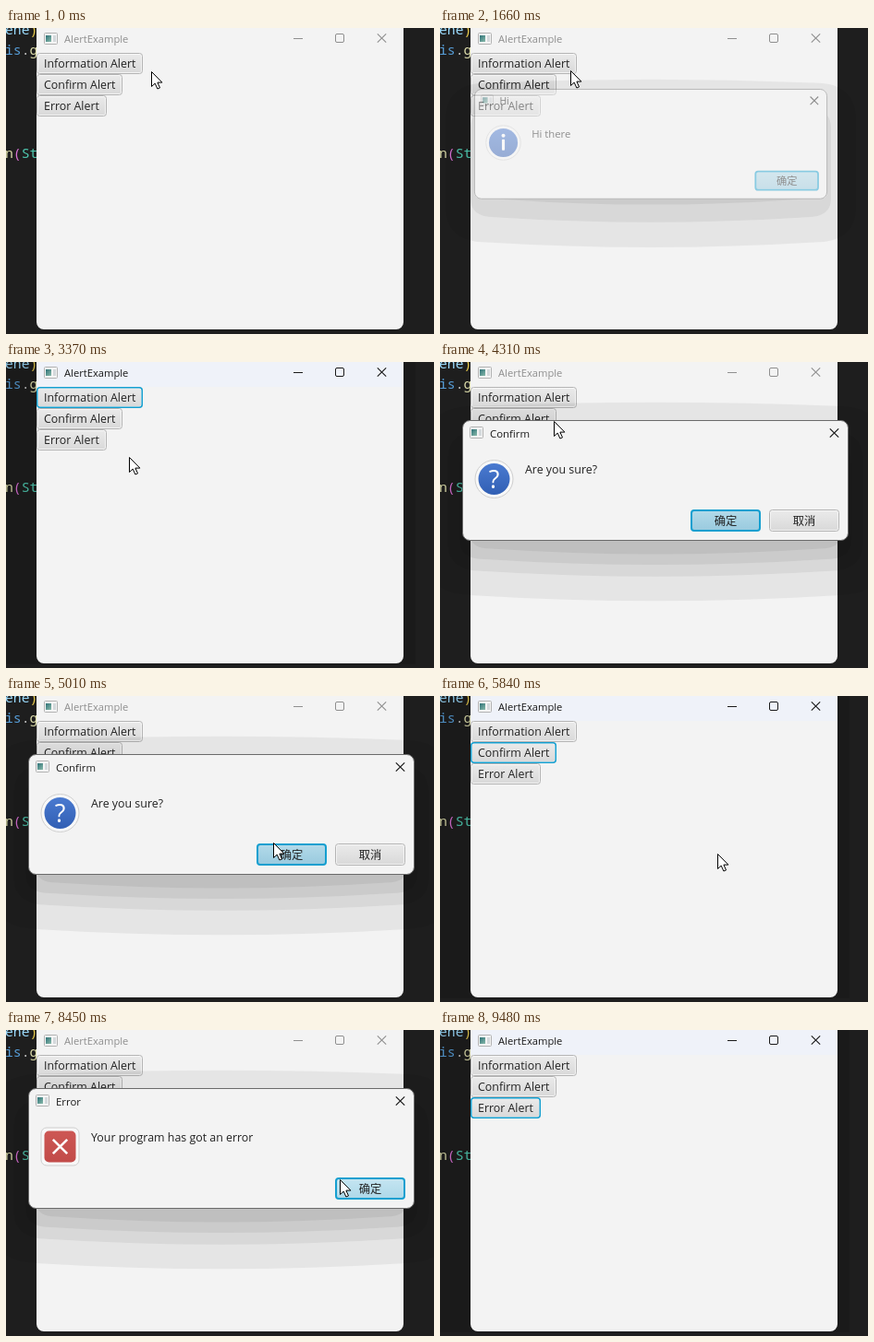
These frames come from a looping animation (463x332 px, 9.76 s). An HTML page with a canvas:

```html
<!DOCTYPE html>
<html lang="en">
<head>
<meta charset="utf-8">
<title>Alert dialogs</title>
<style>
html, body { margin: 0; width: 100%; height: 100%; overflow: hidden; background: #1e1e1e; }
canvas { display: block; width: 463px; height: 332px; }
</style>
</head>
<body>
<canvas id="stage" width="463" height="332"></canvas>
<script>
const LOOP = 9760, STEP = 120, W = 463, H = 332;
const UI = '"Open Sans", "Noto Sans", sans-serif';
const CJK = '"Noto Sans CJK SC", "Noto Sans CJK", sans-serif';
const MONO = '"Noto Sans Mono", "DejaVu Sans Mono", monospace';
const INK = '#222';

const screen = document.getElementById('stage').getContext('2d');
const layer = Object.assign(document.createElement('canvas'), { width: W, height: H }).getContext('2d');
let g = screen;

// Pointer moves: each eases from the previous place.
const HOME = { x: 157, y: 47 };
const MOVES = [
  { from: 1270, to: 1530, x: 141, y: 46 },
  { from: 1660, to: 2240, x: 395, y: 124 },
  { from: 2360, to: 2670, x: 382, y: 168 },
  { from: 2950, to: 3310, x: 133, y: 103 },
  { from: 3310, to: 3760, x: 123, y: 64 },
  { from: 4310, to: 5010, x: 299, y: 165 },
  { from: 5330, to: 5450, x: 300, y: 171 },
  { from: 5840, to: 6630, x: 70, y: 97 },
  { from: 7310, to: 8210, x: 346, y: 157 },
  { from: 8330, to: 8600, x: 382, y: 168 },
  { from: 8870, to: 9480, x: 396, y: 345 }
];

const DIALOGS = [
  { button: 'Information Alert', title: 'Hi', text: 'Hi there', icon: 'info', open: 1590, close: 2950 },
  { button: 'Confirm Alert', title: 'Confirm', text: 'Are you sure?', icon: 'ask', open: 4060, close: 5720, cancel: true },
  { button: 'Error Alert', title: 'Error', text: 'Your program has got an error', icon: 'error', open: 7180, close: 8870 }
];
const PRESS = 60, FADE = 120, GROW = 240;
const BOX = { x: 24, y: 63, w: 418, h: 131 };
const PIVOT = { x: 175, y: 98 };

const clamp = v => Math.max(0, Math.min(1, v));

function text(str, x, y, size, color, family = UI, align = 'left') {
  g.font = `${size}px ${family}`;
  g.textAlign = align;
  g.fillStyle = color;
  g.fillText(str, x, y);
  return g.measureText(str).width;
}

function box(x, y, w, h, r, fill, stroke, lw = 1) {
  g.beginPath();
  g.roundRect(x, y, w, h, r);
  if (fill) { g.fillStyle = fill; g.fill(); }
  if (stroke) { g.strokeStyle = stroke; g.lineWidth = lw; g.stroke(); }
}

function disc(x, y, r, fill, stroke) {
  box(x - r, y - r, 2 * r, 2 * r, r, fill, stroke);
}

function gradient(x0, y0, x1, y1, a, b) {
  const s = g.createLinearGradient(x0, y0, x1, y1);
  s.addColorStop(0, a);
  s.addColorStop(1, b);
  return s;
}
const shade = (y, h, top, bottom) => gradient(0, y, 0, y + h, top, bottom);

function cross(x, y, r, color, lw) {
  g.beginPath();
  g.moveTo(x - r, y - r); g.lineTo(x + r, y + r);
  g.moveTo(x + r, y - r); g.lineTo(x - r, y + r);
  g.strokeStyle = color;
  g.lineWidth = lw;
  g.stroke();
}

function windowIcon(x, y) {
  box(x + .5, y + .5, 14, 12, 1, '#f4f4f4', '#b2b2b2');
  g.fillStyle = gradient(x + 2, y + 3, x + 9, y + 10, '#2f7278', '#8fbfae');
  g.fillRect(x + 2, y + 3, 6, 7);
  g.fillStyle = '#d4d9dc';
  g.fillRect(x + 10, y + 3, 3, 7);
}

function button(x, y, w, h, { focus, primary, hover, pressed }) {
  let tones = primary ? ['#b4dbea', '#98c9de'] : ['#ebebeb', '#d8d8d8'];
  if (hover) tones = primary ? ['#c6e6f2', '#acd7e8'] : ['#f3f3f3', '#e3e3e3'];
  if (pressed) tones = primary ? ['#92c2d7', '#a5d0e2'] : ['#d2d2d2', '#dcdcdc'];
  const line = primary ? 2 : focus ? 1.5 : 1;
  box(x + 1.5, y + 1.5, w - 3, h - 3, 2, shade(y, h, ...tones), 'rgba(255,255,255,.45)');
  box(x + line / 2, y + line / 2, w - line, h - line, 3, null, focus ? '#149fd0' : '#b4b4b4', line);
}

function code() {
  const line = (y, ...tokens) => {
    let x = -1;
    for (const [str, color] of tokens) x += text(str, x, y, 14.7, color, MONO);
  };
  line(7, ['ene', '#9cdcfe'], [')', '#e6c84a']);
  line(29, ['is', '#569cd6'], ['.', '#d4d4d4'], ['g', '#dcdcaa']);
  line(141, ['n', '#dcdcaa'], ['(', '#da70d6'], ['St', '#4ec9b0']);
}

function mainWindow(active, focus, pressed) {
  const ink = active ? '#1a1a1a' : '#8f8f8f';
  if (active) {
    g.fillStyle = 'rgba(0,0,0,.12)';
    g.fillRect(0, 0, 443, 328);
  }
  box(33, -20, 397, 347, 8, '#f3f3f3');
  if (active) {
    g.fillStyle = '#eff2f9';
    g.fillRect(33, 0, 397, 27);
  }
  windowIcon(41, 5);
  text('AlertExample', 63, 16, 11.2, ink);
  g.fillStyle = ink;
  g.fillRect(311, 11, 10, 1);
  box(356.5, 6.5, 9, 9, 1.5, null, ink);
  cross(406.5, 11, 4.7, ink, 1.1);
  DIALOGS.forEach((d, i) => {
    const y = 27 + 23 * i;
    g.font = `12.4px ${UI}`;
    const w = Math.round(g.measureText(d.button).width) + 16;
    button(33, y, w, 23, { focus: active && focus === i, pressed: pressed && focus === i });
    text(d.button, 41, y + 16, 12.4, INK);
  });
}

// Stepped drop shadow, each contour taken from a soft falloff.
function shadow(fade) {
  const { x, y, w, h } = BOX, peak = .3 * fade, drop = 23;
  g.save();
  g.beginPath();
  g.rect(-W, -H, 3 * W, 3 * H);
  g.roundRect(x, y, w, h, 8);
  g.clip('evenodd');
  g.fillStyle = 'rgba(0,0,0,.06)';
  for (let level = .014; level < peak; level += .06) {
    const d = 14 * Math.log(peak / level - 1);
    const l = x - d, r = x + w + d, t = y - d + drop, b = y + h + d + drop;
    const c = Math.max(22, 25 + d * .7);
    g.beginPath();
    g.moveTo(l, t + c);
    g.quadraticCurveTo(l, t + 4, l + c, t + 4);
    g.quadraticCurveTo((l + r) / 2, t - 4, r - c, t + 4);
    g.quadraticCurveTo(r, t + 4, r, t + c);
    g.lineTo(r, b - c);
    g.quadraticCurveTo(r, b - 6, r - c, b - 6);
    g.quadraticCurveTo((l + r) / 2, b + 6, l + c, b - 6);
    g.quadraticCurveTo(l, b - 6, l, b - c);
    g.fill();
  }
  g.restore();
}

function alertIcon(kind) {
  if (kind === 'error') {
    box(38, 106, 41, 41, 6, '#f8f8f8', '#cfcfcf');
    box(41.5, 109.5, 34, 34, 5, shade(109, 34, '#cd5754', '#c24b49'));
    cross(58.5, 126.5, 7.7, '#fff', 2.6);
    return;
  }
  disc(58.5, 127, 20.5, '#f8f8f8', '#cfcfcf');
  disc(58.5, 127, 17, shade(110, 34, '#4a7ad0', '#315fb4'));
  if (kind === 'ask') {
    text('?', 58.5, 136.5, 27, '#fff', UI, 'center');
  } else {
    disc(58.5, 118.5, 2.2, '#fff');
    box(56.8, 123, 3.4, 13, 1, '#fff');
  }
}

function dialogButton(label, x, w, opts, pointer) {
  const hover = pointer.x >= x && pointer.x < x + w && pointer.y >= 160 && pointer.y < 184;
  button(x, 160, w, 24, { ...opts, hover });
  text(label, x + w / 2, 177, 12.3, INK, CJK, 'center');
}

function dialogFace(d, pressed, pointer) {
  box(BOX.x + .5, BOX.y + .5, BOX.w - 1, BOX.h - 1, 8, '#f3f3f3', '#6a6a6a');
  windowIcon(32, 70);
  text(d.title, 54, 82, 11.4, '#1a1a1a');
  cross(426.5, 77, 4.7, '#1a1a1a', 1.2);
  alertIcon(d.icon);
  text(d.text, 92, 121, 12.4, INK);
  const ok = { primary: true, focus: true, pressed };
  dialogButton('确定', d.cancel ? 271 : 356, 76, ok, pointer);
  if (d.cancel) dialogButton('取消', 356, 76, {}, pointer);
}

function dialog(d, t, pointer) {
  const age = t - d.open, gone = t - d.close;
  if (age < 0 || gone >= FADE) return;
  const leave = clamp(gone / FADE);
  const fade = clamp(age / FADE) * (1 - leave);
  const scale = 1 - .19 * (1 - clamp(age / GROW)) ** 2.3 - .05 * leave;
  const scaled = paint => {
    g.save();
    g.translate(PIVOT.x, PIVOT.y);
    g.scale(scale, scale);
    g.translate(-PIVOT.x, -PIVOT.y);
    paint();
    g.restore();
  };

  scaled(() => shadow(fade));
  g = layer;
  g.clearRect(0, 0, W, H);
  scaled(() => dialogFace(d, gone >= 0, pointer));
  g = screen;
  g.globalAlpha = fade ** 1.4;
  g.drawImage(layer.canvas, 0, 0);
  g.globalAlpha = 1;
}

function pointerAt(t) {
  let { x, y } = HOME;
  for (const m of MOVES) {
    const p = clamp((t - m.from) / (m.to - m.from)), e = p * p * (3 - 2 * p);
    x += (m.x - x) * e;
    y += (m.y - y) * e;
  }
  return { x: Math.round(x), y: Math.round(y) };
}

function cursor({ x, y }) {
  g.save();
  g.translate(x + .5, y + .5);
  const arrow = new Path2D('M0 0V16L3.7 12.6L6.4 18.5L9 17.4L6.4 11.6H11.4Z');
  g.fillStyle = '#fff';
  g.fill(arrow);
  g.strokeStyle = '#000';
  g.lineWidth = 1;
  g.stroke(arrow);
  g.restore();
}

// The picture refreshes in even steps, counted from the latest move.
function snap(time) {
  const from = MOVES.findLast(m => m.from <= time)?.from ?? 0;
  return from + Math.floor((time - from) / STEP) * STEP;
}

function draw(now) {
  const t = snap(now % LOOP);
  const pointer = pointerAt(t);
  const focus = DIALOGS.findLastIndex(d => t >= d.open - PRESS);
  const current = DIALOGS[focus];
  const pressed = !!current && t < current.open;
  const active = pressed || (!!current && t > current.close);

  g.fillStyle = '#1e1e1e';
  g.fillRect(0, 0, W, H);
  code();
  mainWindow(active, focus, pressed);
  if (current) dialog(current, t, pointer);
  cursor(pointer);
}

let start;
function tick(now) {
  start ??= now;
  draw(now - start);
  requestAnimationFrame(tick);
}
draw(0);
requestAnimationFrame(tick);
</script>
</body>
</html>
```
